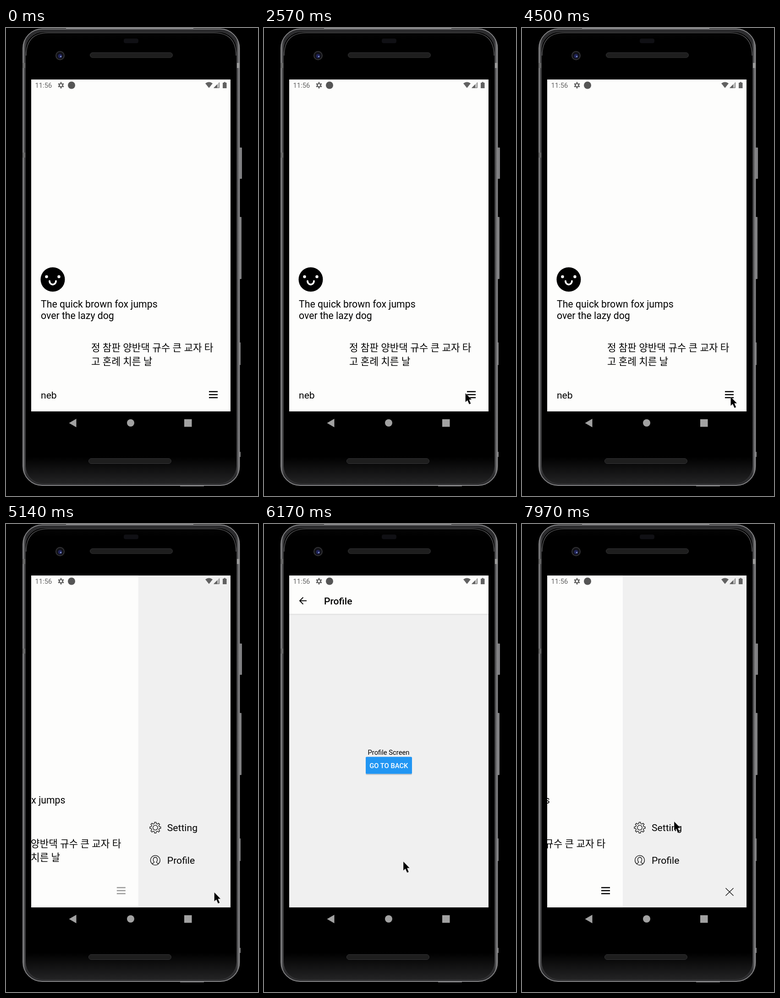
An HTML page for the animation above (8000 ms loop, 550 by 1018 pixels).

```html
<!DOCTYPE html>
<html lang="ko">
<head>
<meta charset="utf-8">
<style>
  html, body { margin: 0; width: 100%; height: 100%; overflow: hidden; background: #000; }
  svg { display: block; width: 550px; height: 1018px; font: 21.12px Roboto, "Noto Sans CJK KR", "Noto Sans CJK", sans-serif; }
  .medium { font-weight: 500; }
  .line { fill: none; stroke: #111; stroke-width: 1.3; }
</style>
</head>
<body>
<svg viewBox="0 0 550 1018">
  <defs>
    <clipPath id="screen"><rect x="55" y="112" width="435" height="722"/></clipPath>
    <linearGradient id="metal">
      <stop offset="0" stop-color="#8a8a8c"/><stop offset=".007" stop-color="#4c4c4e"/>
      <stop offset=".016" stop-color="#2c2c2e"/><stop offset=".985" stop-color="#2c2c2e"/>
      <stop offset=".993" stop-color="#5c5c5e"/><stop offset="1" stop-color="#909092"/>
    </linearGradient>
    <linearGradient id="glass" x2="0" y2="1">
      <stop offset="0" stop-color="#050505"/><stop offset=".02" stop-color="#000"/>
      <stop offset=".94" stop-color="#000"/><stop offset="1" stop-color="#242425"/>
    </linearGradient>
    <linearGradient id="shade" x2="0" y2="1">
      <stop offset="0" stop-color="#d8d8d8"/><stop offset="1" stop-color="#f0f0f0"/>
    </linearGradient>
    <pattern id="mesh" width="3" height="3" patternUnits="userSpaceOnUse">
      <rect width="3" height="3" fill="#191919"/><circle cx="1.5" cy="1.5" r=".8" fill="#343434"/>
    </pattern>
  </defs>

  <!-- phone -->
  <g fill="#808082">
    <rect x="509" y="260" width="6" height="68" rx="1"/>
    <rect x="509" y="411" width="5" height="135" rx="1"/>
    <rect x="509" y="684" width="3" height="49"/>
    <rect x="509" y="922" width="3" height="11"/>
    <rect x="131" y="0" width="278" height="3"/>
    <rect x="380" y="994" width="52" height="3"/>
  </g>
  <rect x="37" y="2" width="472.500" height="993" rx="42" fill="url(#metal)" stroke="#868688" stroke-width="1.800"/>
  <g fill="#999">
    <rect x="36" y="76" width="7" height="11" fill="#666"/><rect x="503" y="76" width="7" height="11"/>
    <rect x="36" y="271" width="6" height="11" fill="#666"/>
  </g>
  <rect x="42.500" y="8.500" width="461" height="983" rx="39" fill="url(#glass)" stroke="#38383a"/>
  <path d="M44 60Q44 10.500 92 10.500H454Q502 10.500 502 60" fill="none" stroke="#6a6a6c" stroke-width="1.200"/>
  <rect x="257" y="23" width="32" height="10" rx="4" fill="#101014"/>
  <circle cx="118" cy="60" r="9" fill="#111116" stroke="#333336" stroke-width="2"/>
  <circle cx="118" cy="61" r="4.500" fill="#20245a"/><circle cx="119.500" cy="62" r="1.600" fill="#8fa2d8"/>
  <g fill="url(#mesh)" stroke="#303032">
    <rect x="183.500" y="53.500" width="180" height="11" rx="5.500"/>
    <rect x="180.500" y="936.500" width="180" height="11" rx="5.500"/>
  </g>
  <g fill="#a2a2a2">
    <path d="M153.500 850v18.500l-16-9.200z"/><circle cx="272" cy="859" r="8"/>
    <rect x="389" y="851" width="16.500" height="16.500"/>
  </g>

  <g clip-path="url(#screen)">
    <rect x="55" y="112" width="435" height="722" fill="#f0f0f0"/>
    <g id="home">
      <g id="slider">
        <rect x="0" y="60" width="490" height="850" fill="#fdfdfc"/>
        <circle cx="102" cy="547" r="26.500"/>
        <g fill="#fff"><circle cx="88.500" cy="541" r="3.200"/><circle cx="115.500" cy="541" r="3.200"/></g>
        <path d="M95 550.500a7 7.500 0 0 0 14 0" fill="none" stroke="#fff" stroke-width="3.800" stroke-linecap="round"/>
        <g font-size="21.280">
          <text x="76" y="608">The quick brown fox jumps</text>
          <text x="76" y="633">over the lazy dog</text>
          <text x="186" y="703">정 참판 양반댁 규수 큰 교자 타</text>
          <text x="186" y="733.500">고 혼례 치른 날</text>
        </g>
        <text x="76" y="806">neb</text>
        <path id="menu" d="M443 791h19M443 797.500h19M443 804h19" stroke="#000" stroke-width="2.400"/>

        <rect x="490" y="60" width="400" height="850" fill="#f0f0f0"/>
        <g class="line">
          <path id="cog"/><circle cx="527" cy="660.500" r="5.200"/>
          <circle cx="527" cy="731.500" r="10.400"/>
          <path d="M520 739.500c1-2 4.500-2 4.800-4c-3.500-3-3-10.500 2.200-10.500s5.700 7.500 2.200 10.500c.3 2 3.800 2 4.800 4"/>
          <path id="close" d="M714.500 792l17 16.500m0-16.500l-17 16.500"/>
        </g>
        <text x="553" y="668">Setting</text>
        <text x="553" y="739">Profile</text>
      </g>
    </g>

    <g id="profile">
      <rect x="55" y="112" width="435" height="722" fill="#f0f0f0"/>
      <rect x="55" y="195" width="435" height="4" fill="url(#shade)"/>
      <rect x="55" y="112" width="435" height="83.500" fill="#fdfdfc"/>
      <path d="M93 167H78m7.500-7.500L78 167l7.500 7.500" fill="none" stroke="#111" stroke-width="2"/>
      <text class="medium" x="131" y="174.500">Profile</text>
      <g text-anchor="middle" font-size="14.780">
        <text x="272" y="502">Profile Screen</text>
        <rect x="222" y="508" width="101" height="38" rx="2" fill="#000" opacity=".15"/>
        <rect x="222" y="506.500" width="101" height="37" rx="2" fill="#2196f3"/>
        <text class="medium" x="272.300" y="531" fill="#fff">GO TO BACK</text>
      </g>
    </g>

    <g fill="#616161">
      <text x="63.500" y="130" font-size="14.780">11:56</text>
      <path id="statusCog" fill-rule="evenodd"/>
      <circle cx="143" cy="124.500" r="8" fill="#555"/>
      <path d="M435 120.500q8-6 16 0l-8 10z"/>
      <path d="M453 130.500L466 117.500v13z" opacity=".35"/><path d="M453 130.500l8-8v8z"/>
      <path d="M465.400 118.500v11.500h-11" fill="none" stroke="#616161"/>
      <path d="M473 119h2.500v-1.500h3.500V119h2.500v12H473z"/>
    </g>
  </g>
  <path id="cursor" d="M0 0V20L4.500 16L8.300 24.500L12 23L8.400 14.500H14z" stroke="#fff" stroke-width=".4"/>
</svg>

<script>
const LOOP = 8000, DRAWER = 270;
const [home, slider, menu, closeIcon, profile, cursor] =
  ['home', 'slider', 'menu', 'close', 'profile', 'cursor'].map(id => document.getElementById(id));
const clamp = v => Math.min(1, Math.max(0, v));
const smooth = v => v * v * (3 - 2 * v);

function gear(cx, cy, inner, outer, teeth) {
  const points = [];
  for (let i = 0; i < teeth; i++) {
    for (const [shift, r] of [[-.3, inner], [-.18, outer], [.18, outer], [.3, inner]]) {
      const a = (i + shift) / teeth * 2 * Math.PI - Math.PI / 2;
      points.push(`${cx + r * Math.cos(a)} ${cy + r * Math.sin(a)}`);
    }
  }
  return `M${points.join('L')}Z`;
}
document.getElementById('cog').setAttribute('d', gear(527, 660.5, 9, 12, 8));
document.getElementById('statusCog').setAttribute('d',
  gear(120, 124.5, 4.8, 7, 6) + 'M122.400 124.500a2.400 2.400 0 1 0-4.800 0a2.400 2.400 0 1 0 4.800 0z');

// Critically damped spring
function spring(ms) {
  const x = Math.max(0, ms) * .01826;
  return 1 - Math.exp(-x) * (1 + x);
}

// cubic-bezier(.35, .45, 0, 1)
function ease(x) {
  let lo = 0, hi = 1, u;
  for (let i = 0; i < 20; i++) {
    u = (lo + hi) / 2;
    if (1.05 * u * (1 - u) ** 2 + u ** 3 < x) lo = u; else hi = u;
  }
  return 1.35 * u * (1 - u) ** 2 + 3 * u * u * (1 - u) + u ** 3;
}

// Opacity of a touched icon: dims on press, recovers after release
function touch(t, press, release) {
  const v = clamp((t - release) / 250);
  const back = v < .5 ? 2 * v * v : 1 - 2 * (1 - v) ** 2;
  return 1 - .8 * clamp((t - press) / 100) * (1 - back);
}

// time, x, y
const path = [
  [2050, 450, 880], [2480, 439.5, 794], [3000, 439.5, 794], [3500, 461, 808.5],
  [4150, 461, 808.5], [4600, 454.5, 801], [5200, 454.5, 801], [5650, 304, 734],
  [6250, 304, 734], [6850, 88, 157], [7080, 88, 157], [7800, 332, 647], [LOOP, 332, 647]
];

function moveCursor(t) {
  const shown = t >= path[0][0];
  cursor.setAttribute('visibility', shown ? 'visible' : 'hidden');
  if (!shown) return;
  const i = path.findIndex(key => key[0] > t);
  const [t0, x0, y0] = path[i - 1], [t1, x1, y1] = path[i];
  const k = smooth((t - t0) / (t1 - t0));
  cursor.setAttribute('transform', `translate(${x0 + (x1 - x0) * k} ${y0 + (y1 - y0) * k})`);
}

function zoom(node, scale, opacity) {
  node.setAttribute('transform', `translate(272.500 473) scale(${scale}) translate(-272.500 -473)`);
  node.setAttribute('opacity', opacity);
}

function draw(t) {
  const open = spring(t - 2800) - spring(t - 3900) + spring(t - 4995);
  slider.setAttribute('transform', `translate(${-DRAWER * open} 0)`);
  menu.setAttribute('opacity', t < 4000 ? touch(t, 2700, 2860) : touch(t, 4900, 5055));
  closeIcon.setAttribute('opacity', touch(t, 3800, 3960));

  const closing = t >= 7230;
  const shown = closing ? 1 - ease(clamp((t - 7230) / 400)) : ease(clamp((t - 5730) / 400));
  zoom(home, 1 + .075 * shown, 1 - clamp((shown - .2075) / .7925));
  zoom(profile, closing ? .925 + .075 * shown : .85 + .15 * shown, clamp((shown - .75) / .125));
  moveCursor(t);
}

function frame() {
  draw(performance.now() % LOOP);
  requestAnimationFrame(frame);
}
frame();
</script>
</body>
</html>
```
